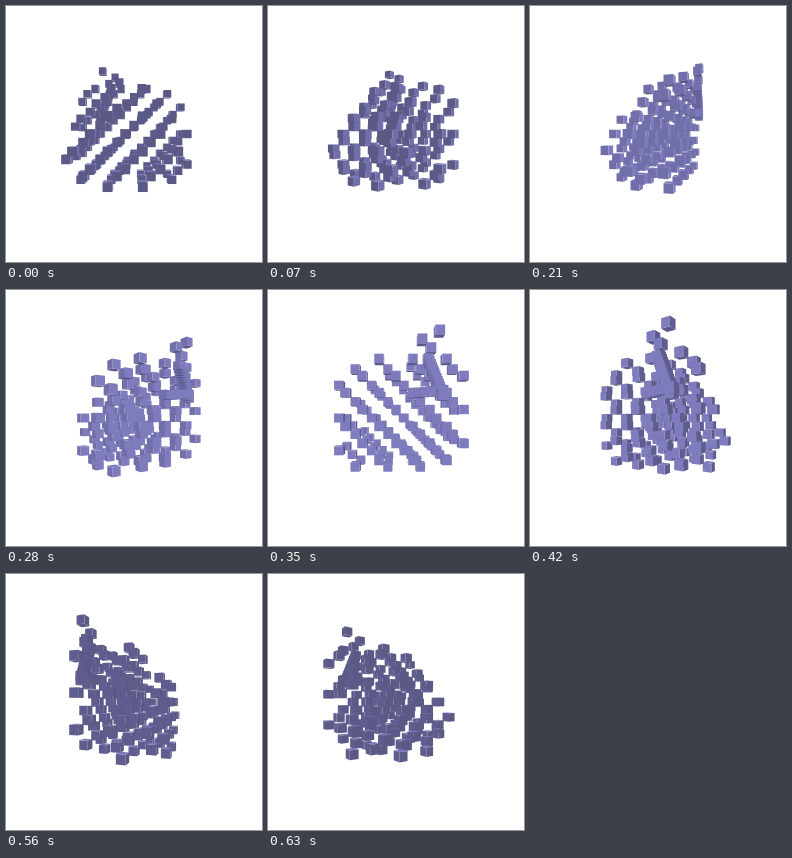
Animation of 256x256 px, one loop 700 ms. Source, as an HTML page with a canvas:

```html
<!DOCTYPE html>
<html>
<head>
<meta charset="utf-8">
<style>
html, body { margin: 0; overflow: hidden; background: #fff; }
canvas { display: block; }
</style>
</head>
<body>
<canvas width="256" height="256"></canvas>
<script>
const ctx = document.querySelector('canvas').getContext('2d');
const CENTER = 128, DEPTH = 221.7, HALF = 4, UNIT = 7.25, STEP = 70, STEPS = 10;
const points = [];
const add = (x, y, z) => points.push([x * UNIT, y * UNIT, z * UNIT]);
const mod = (n, m) => (n % m + m) % m;

// Facets that bound the crystal.
const inside = (x, y, z) =>
  x - y - z <= 10 && -x - y - z <= 8 && x + y + z <= 15 && x + y - z <= 15 &&
  y - x + z <= 14 && y - x - z <= 12 && x - y + z <= 17 && z - x - y <= 14 &&
  y + z >= -7;

// Paired layers; rows lie on every fourth diagonal.
for (const z of [-5, -4, -1, 0, 3, 4])
  for (let x = -7; x <= 8; x++)
    for (let y = -7; y <= 6; y++)
      if (mod(x + z, 2) === 0 && mod(y - x, 4) === 3 && inside(x, y, z)) add(x, y, z);

// Two dense streaks with a few outliers above them.
function streak(from, to, count) {
  for (let i = 0; i < count; i++) {
    const t = i / (count - 1);
    add(...from.map((v, axis) => v + (to[axis] - v) * t));
  }
}
streak([3.7, -6.8, 4.9], [5.4, -2.6, 4.9], 14);
streak([2, -2.9, 4.4], [5.4, -3.2, 4.9], 6);
add(5, -10, 5);
add(3, -9, 5);
add(4, -8, 5);

// Each face: axis, side and colour; the light turns with the object.
const faces = [
  [0, -1, '#716fa9'], [0, 1, '#5f5d8e'],
  [1, -1, '#7a78b8'], [1, 1, '#5c5a8a'],
  [2, -1, '#5b5a86'], [2, 1, '#7e7cbc']
];
const ring = [[-1, -1], [1, -1], [1, 1], [-1, 1]];

function draw(step) {
  const angle = (step - 5) * 2 * Math.PI / STEPS;
  const c = Math.cos(angle), s = Math.sin(angle);
  const turn = ([x, y, z]) => [x * c - z * s, y, x * s + z * c];
  const distance = p => Math.hypot(p[0], p[1], DEPTH - p[2]);

  ctx.fillStyle = '#fff';
  ctx.fillRect(0, 0, 256, 256);
  const cubes = points.map(p => ({ p, q: turn(p) }));
  cubes.sort((a, b) => distance(b.q) - distance(a.q));

  for (const { p, q } of cubes)
    for (const [axis, side, color] of faces) {
      const normal = [0, 0, 0];
      normal[axis] = side;
      const n = turn(normal);
      const facing = -n[0] * q[0] - n[1] * q[1] + n[2] * (DEPTH - q[2]);
      if (facing <= HALF) continue;
      ctx.beginPath();
      for (const [a, b] of ring) {
        const corner = [...p];
        corner[axis] += side * HALF;
        corner[(axis + 1) % 3] += a * HALF;
        corner[(axis + 2) % 3] += b * HALF;
        const [x, y, z] = turn(corner);
        const k = DEPTH / (DEPTH - z);
        ctx.lineTo(CENTER + x * k, CENTER + y * k);
      }
      ctx.fillStyle = color;
      ctx.fill();
    }
}

function tick() {
  draw(Math.floor(performance.now() / STEP) % STEPS);
  requestAnimationFrame(tick);
}
tick();
</script>
</body>
</html>
```
